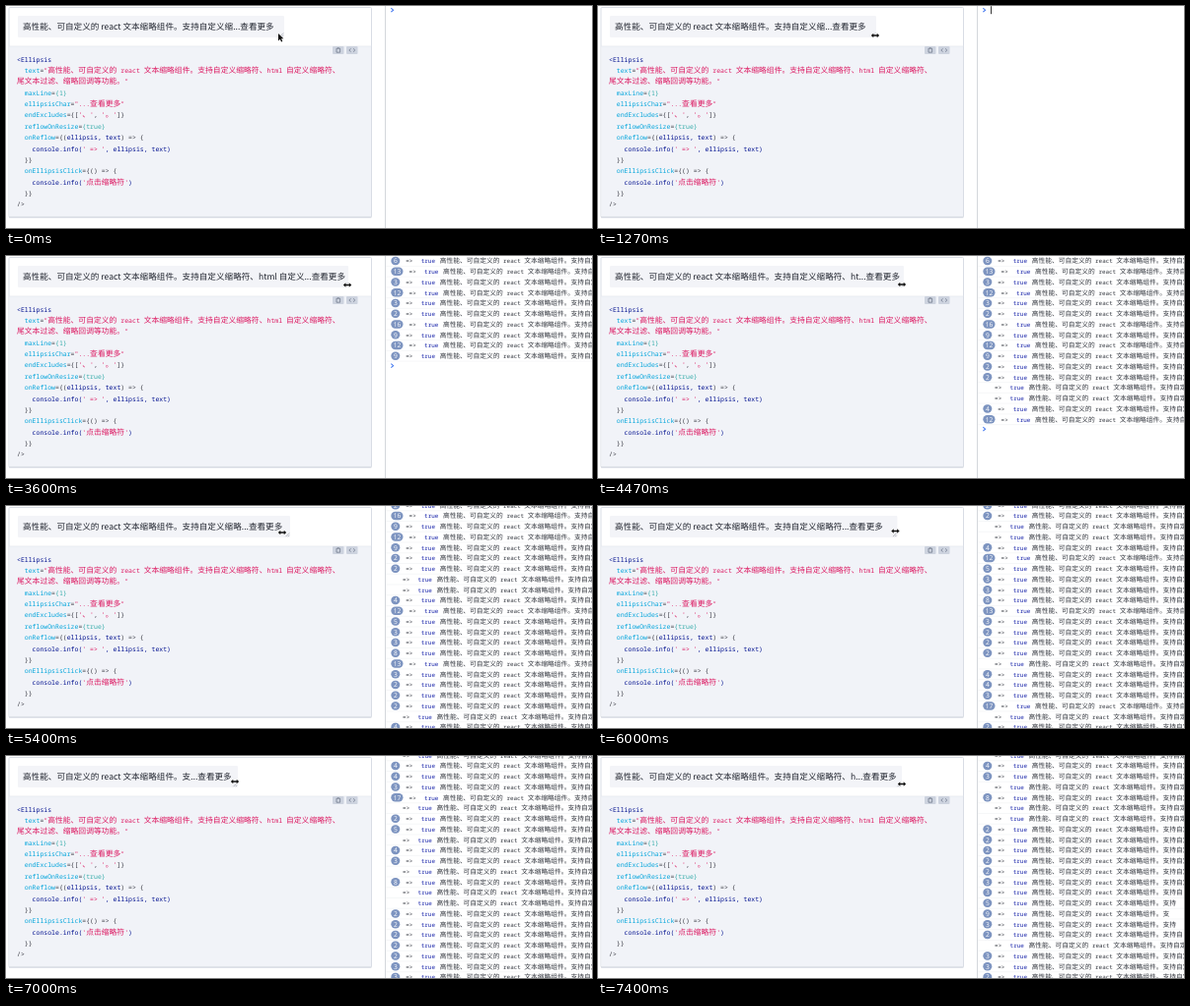
An HTML page that plays this animation: 594x226 px, repeating every 7470 ms.

```html
<!DOCTYPE html>
<html lang="zh-CN">
<head>
<meta charset="utf-8">
<title>Ellipsis demo</title>
<style>
  html, body { margin: 0; width: 100%; height: 100%; overflow: hidden; background: #fff; }
  svg { display: block; width: 594px; height: 226px; }
  text { white-space: pre; text-rendering: geometricPrecision; font-family: "Noto Sans CJK SC", "Noto Sans CJK JP", "Noto Sans CJK", sans-serif; }
  .latin { font-family: "Noto Sans Mono", "Liberation Mono", monospace; }
  .count { font-family: "Open Sans", "Noto Sans", sans-serif; font-size: 6.6px; fill: #fff; text-anchor: middle; }
</style>
</head>
<body>
<svg id="stage" viewBox="0 0 594 226"></svg>
<script>
const LOOP = 7470, FRAME = 200 / 3;
const ROW = 10.75, VISIBLE_ROWS = 23.47;
const NAVY = '#00108f', CYAN = '#00a4db', PINK = '#dc1760', TEAL = '#36acaa', INK = '#393a44';

const stage = document.getElementById('stage');
function add(parent, tag, attrs = {}, text) {
  const el = document.createElementNS(stage.namespaceURI, tag);
  for (const key in attrs) el.setAttribute(key, attrs[key]);
  if (text !== undefined) el.textContent = text;
  parent.append(el);
  return el;
}
const rect = (parent, x, y, width, height, fill, more) =>
  add(parent, 'rect', { x, y, width, height, fill, ...more });
const line = (parent, d, stroke, width = 1) =>
  add(parent, 'path', { d, stroke, fill: 'none', 'stroke-width': width });
const isWide = ch => ch >= '\u3000';

// Sets mixed text on a column grid and returns the x where it ends.
function mono(parent, x, y, text, fill, latinWidth, wideWidth) {
  for (const run of text.match(/[\u3000-\uffff]+|[^\u3000-\uffff]+/g)) {
    const wide = isWide(run);
    add(parent, 'text', {
      x, y, fill, class: wide ? 'wide' : 'latin',
      'font-size': wide ? wideWidth : latinWidth / 0.6
    }, run);
    x += run.length * (wide ? wideWidth : latinWidth);
  }
  return x;
}

// Demo card
rect(stage, 3, 1.5, 367.5, 213.5, '#fff', { stroke: '#d9dde5', rx: 1 });
rect(stage, 3.5, 41, 366.5, 173.5, '#f1f3f8');
line(stage, 'M3 41H370.5', '#e3e6ed', 0.7);
line(stage, 'M3 215H370.5', '#cfd4dd');
const box = rect(stage, 12, 10, 270, 22, '#f3f4f8', { rx: 1 });
const grip = line(stage, 'M-4.5 -.8L-.8 -4.5M-2.3 -.8L-.8 -2.3', '#8b8f98', 0.6);
const demo = add(stage, 'text', { x: 17, y: 24.3, 'font-size': 8.6, fill: '#20242e' });

for (const x of [331, 345]) rect(stage, x, 41, 11.5, 8, '#cdd3df', { rx: 1 });
line(stage, 'M335 43.2h3.6v4h-3.6zM336 42.8h1.6', '#667085', 0.7);
line(stage, 'M349.6 43.3l-1.8 1.7 1.8 1.7M352 43.3l1.8 1.7-1.8 1.7', '#667085', 0.7);

const code = [
  [NAVY, '<Ellipsis'],
  [CYAN, '  text', INK, '=', PINK, '"高性能、可自定义的 react 文本缩略组件。支持自定义缩略符、html 自定义缩略符、'],
  [PINK, '尾文本过滤、缩略回调等功能。"'],
  [CYAN, '  maxLine', INK, '=', TEAL, '{1}'],
  [CYAN, '  ellipsisChar', INK, '=', PINK, '"...查看更多"'],
  [CYAN, '  endExcludes', INK, '={[', PINK, "'、'", INK, ', ', PINK, "'。'", INK, ']}'],
  [CYAN, '  reflowOnResize', INK, '=', TEAL, '{true}'],
  [CYAN, '  onReflow', INK, '={(', NAVY, 'ellipsis, text', INK, ') => {'],
  [NAVY, '    console.info(', PINK, "' => '", NAVY, ', ellipsis, text)'],
  [INK, '  }}'],
  [CYAN, '  onEllipsisClick', INK, '={() => {'],
  [NAVY, '    console.info(', PINK, "'点击缩略符'", NAVY, ')'],
  [INK, '  }}'],
  [INK, '/>']
];
code.forEach((tokens, i) => {
  let x = 11;
  for (let k = 0; k < tokens.length; k += 2)
    x = mono(stage, x, 56.7 + i * 11.35, tokens[k + 1], tokens[k], 3.9, 7.8);
});

// Console
rect(stage, 385, 0, 209, 226, '#fff');
line(stage, 'M384.5 0V226', '#d4d7dc');
const log = add(stage, 'g');
const counts = [6, 13, 3, 12, 3, 2, 16, 9, 12, 9, 2, 2, 1, 1, 4, 12, 5, 3, 3, 8,
  13, 3, 2, 2, 2, 1, 4, 4, 3, 17, 1, 2, 5, 1, 4, 3, 1, 8, 1, 1,
  2, 2, 2, 2, 2, 3, 3, 5, 9, 3, 2, 1, 3, 3, 2, 3, 4];
const NARROWEST = 48;

const rows = counts.map((total, i) => {
  const group = add(log, 'g', { transform: `translate(0 ${5 + i * ROW})` });
  line(group, 'M385 5.4H594', '#f0f1f3', 0.6);
  const badge = rect(group, 390.3, -4.2, 9, 8.4, '#7d94c0', { rx: 4.2 });
  const label = add(group, 'text', { class: 'count', y: 2.4 });
  const message = add(group, 'g');
  const tail = '支持自定'.slice(0, 1 + Math.abs(i - NARROWEST));
  mono(message, 405.3, 2.4, '=>', '#30343c', 3.54, 6.75);
  mono(message, 420.8, 2.4, 'true', '#1420a8', 3.54, 6.75);
  mono(message, 439.8, 2.4, '高性能、可自定义的 react 文本缩略组件。' + tail, '#30343c', 3.54, 6.75);
  return {
    group,
    show(count) {
      const digits = count > 1 ? String(count).length : 0;
      badge.style.display = label.style.display = digits ? '' : 'none';
      badge.setAttribute('width', digits > 1 ? 12.2 : 9);
      label.setAttribute('x', digits > 1 ? 396.4 : 394.8);
      label.textContent = count;
      message.setAttribute('transform', `translate(${[-3.2, 0, 3.3][digits]} 0)`);
    }
  };
});
const prompt = add(log, 'g');
line(prompt, 'M390.3 -2L392.6 0L390.3 2', '#4a7df0', 1.1);
const caret = line(prompt, 'M398.5 -4V4', '#222', 0.9);

// Mouse cursors
const outline = { fill: '#111', stroke: '#fff', 'stroke-width': 0.8, 'paint-order': 'stroke' };
const arrow = add(stage, 'path', { d: 'M0 0V7.4L1.8 5.8L3 8.6L4.3 8L3.1 5.3H5.4Z', ...outline });
const resize = add(stage, 'path', {
  d: 'M-4.2 0L-1.7 -2.3V-.7H1.7V-2.3L4.2 0L1.7 2.3V.7H-1.7V2.3Z', ...outline
});

// step, right edge of the box, logged rows, cursor x, cursor y
const keys = [
  [0, 282, 0, 276, 28],
  [8, 282, 0, 279, 29],
  [12, 282, 0, 278, 28],
  [15, 282, 0, 278, 28],
  [19, 282, 0, 281, 30],
  [22, 282, 0, 281, 30],
  [40, 326, 6.55, 325, 29.5],
  [53, 350, 9.5, 349, 29.5],
  [67, 310, 15.95, 308, 29],
  [74, 342, 20.5, 341, 28],
  [81, 288, 28.9, 280, 27],
  [85, 279, 29.5, 277, 26],
  [94, 323, 36.5, 321, 25],
  [98, 310, 39.95, 296, 24.5],
  [105, 235, 48.5, 232, 26],
  [111, 308, 56.8, 308, 28.5]
];
function pose(step) {
  const k = Math.max(1, keys.findIndex(key => key[0] >= step));
  const [a, b] = [keys[k - 1], keys[k]];
  const f = (step - a[0]) / (b[0] - a[0]);
  return a.map((v, i) => v + (b[i] - v) * f);
}

const sentence = '高性能、可自定义的 react 文本缩略组件。支持自定义缩略符、html 自定义缩略符、尾文本过滤';
const narrow = { h: 4.7, t: 3, m: 7.3, l: 2.4, ' ': 2.2 };
function ellipsize(right) {
  let end = 17 + 40.4, n = 0;
  for (const ch of sentence) {
    end += isWide(ch) ? 8.6 : narrow[ch] || 4.35;
    if (end > right - 4) break;
    n++;
  }
  return sentence.slice(0, n).replace(/[、。]$/, '') + '...查看更多';
}

function draw(step) {
  const [, right, logged, x, y] = pose(step);
  const n = Math.ceil(logged);

  box.setAttribute('width', right - 12);
  grip.setAttribute('transform', `translate(${right} 32)`);
  demo.textContent = ellipsize(right);

  rows.forEach((row, i) => {
    row.group.style.display = i < n ? '' : 'none';
    if (i >= n) return;
    const done = Math.min(1, logged - i);
    row.show(Math.min(counts[i], 1 + Math.floor(done * counts[i])));
  });
  log.setAttribute('transform', `translate(0 ${-Math.max(0, n - VISIBLE_ROWS) * ROW})`);
  prompt.setAttribute('transform', `translate(0 ${4.2 + n * ROW})`);
  caret.style.display = (step >= 3 && step < 11) || (step >= 18 && step < 22) ? '' : 'none';

  const pointing = step < 17;
  arrow.style.display = pointing ? '' : 'none';
  resize.style.display = pointing ? 'none' : '';
  (pointing ? arrow : resize).setAttribute('transform', `translate(${x} ${y})`);
}

const start = performance.now();
let last = -1;
function tick() {
  const time = (performance.now() - start) % LOOP;
  const step = Math.min(111, Math.floor((time + 4) / FRAME));
  if (step !== last) draw(last = step);
  requestAnimationFrame(tick);
}
tick();
</script>
</body>
</html>
```
